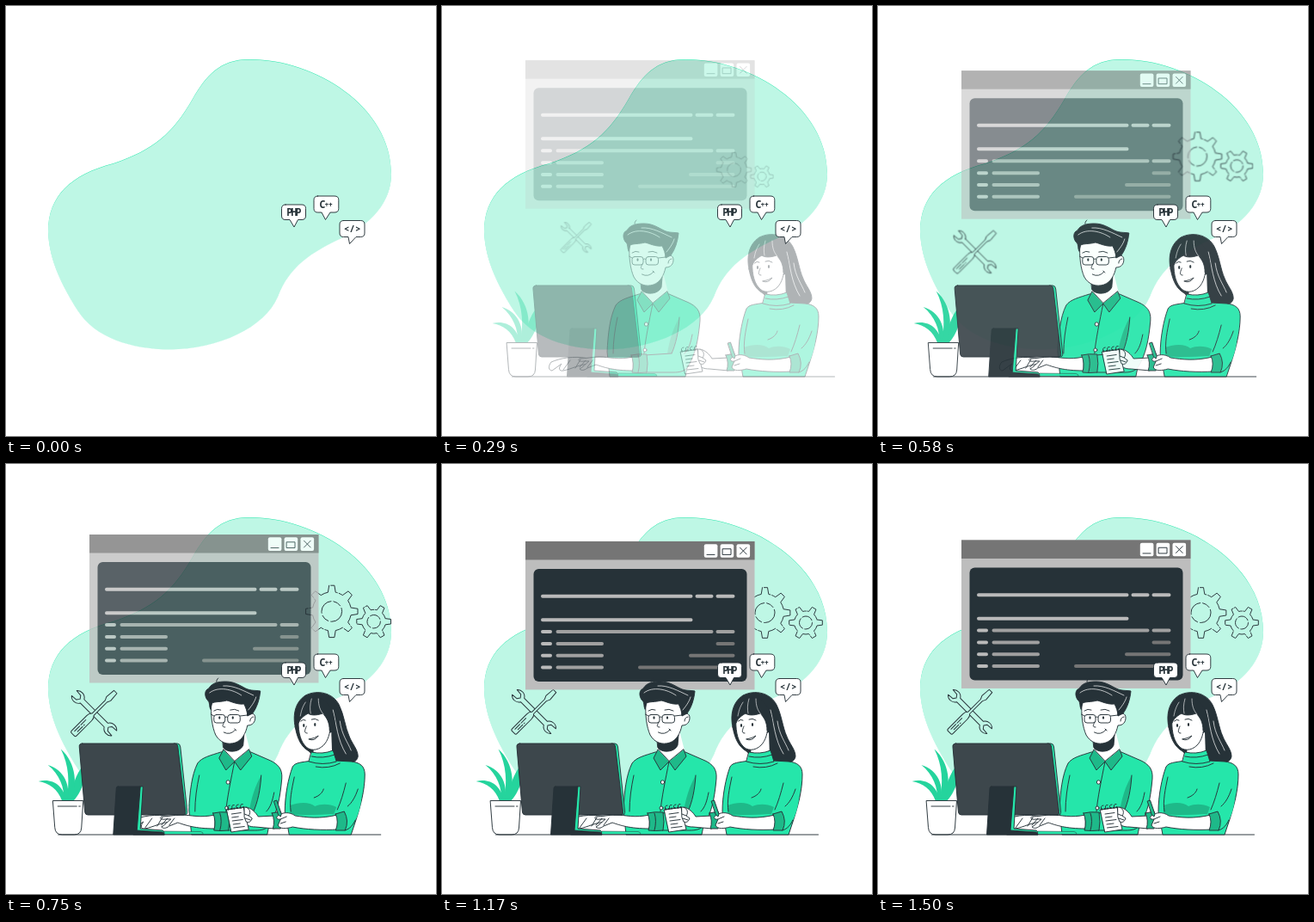
Write an HTML page that moves like this. It is 500 px wide and 500 px high and loops after 1.54 s.

```html
<!DOCTYPE html>
<html lang="en">
<head>
<meta charset="utf-8">
<title>Developers at work</title>
<style>
html, body { margin: 0; width: 100%; height: 100%; overflow: hidden; background: #fff; }
svg { display: block; width: 100vw; height: 100vh; }
.art { stroke: #263238; stroke-width: .95; stroke-linejoin: round; stroke-linecap: round; }
.g { fill: #25e6aa; }
.d { fill: #1eb989; }
.leaf { fill: #25d49d; }
.w { fill: #fff; }
.k { fill: #263238; }
.n { fill: none; }
.x { stroke: none; }
.white { stroke: #fff; }
text { font-family: "Noto Sans Mono", "DejaVu Sans Mono", monospace; font-weight: 700; fill: #263238; text-anchor: middle; stroke: none; }
</style>
</head>
<body>
<svg viewBox="0 0 500 500">
  <defs>
    <path id="blob" d="M285 62C250 61 233 80 217 108C194 148 172 167 125 183C75 196 49 221 49 262C50 297 67 328 84 355C104 386 146 399 190 399.5C247 399 301 374 316 338C329 303 356 286 388 271C425 254 448 228 448 195C448 116 358 62 285 62Z"/>
  </defs>
  <use href="#blob" fill="#25e6aa"/>
  <use href="#blob" y=".5" fill="#fff" opacity=".7"/>

  <g id="icons" class="art n">
    <path id="bigGear" stroke-dasharray="34 2 14 2"/>
    <circle cx="375.5" cy="173" r="11.5" stroke-dasharray="19 3 9 3"/>
    <path id="smallGear" stroke-dasharray="26 1.5 12 1.5"/>
    <circle cx="423" cy="184.5" r="7.5" stroke-dasharray="13 2.5"/>
    <g transform="translate(107 288) rotate(45)">
      <path d="M-19-3H19A8 8 0 0 1 32-4L25-3.4L22.5 0L25 3.4L32 4A8 8 0 0 1 19 3H-19A8 8 0 0 1-32 4L-25 3.4L-22.5 0L-25-3.4L-32-4A8 8 0 0 1-19-3Z"/>
    </g>
    <g transform="translate(107 288) rotate(-45)">
      <path fill="#bdf7e5" d="M-34-2Q-34-4-32-4H-8Q-4-4-2-1.5H19L23-3.3L34-2.4V2.4L23 3.3L19 1.5H-2Q-4 4-8 4H-32Q-34 4-34 2Z"/>
      <path d="M-30-1.3H-11M-28 1.5H-17" stroke-dasharray="8 2"/>
    </g>
  </g>

  <g id="win">
    <rect x="97" y="90" width="266.5" height="172.5" fill="#bdbdbd"/>
    <rect x="97" y="90" width="266.5" height="21.5" fill="#757575"/>
    <rect x="106.5" y="122" width="248" height="131" rx="6" class="k"/>
    <g stroke-width="4" stroke-linecap="round" fill="none">
      <path stroke="#bababa" d="M117 153.7H289.5M296.5 153.7H313.5M320.5 153.7H338.5M117 181.2H289.5M117 195H126M117 209H126M117 222.8H126M117 236.6H126"/>
      <path stroke="#a0a0a0" d="M134.5 195H313.5M320.5 195H338.5M134.5 209H186M134.5 222.8H186M134.5 236.6H186"/>
      <path stroke="#757575" d="M320.5 209H338.5M289 222.8H338.5M230 236.6H338.5"/>
    </g>
    <g class="w">
      <rect x="304.8" y="93.3" width="15.6" height="15.6" rx="2"/>
      <rect x="323.6" y="93.3" width="15.6" height="15.6" rx="2"/>
      <rect x="342.5" y="93.3" width="15.6" height="15.6" rx="2"/>
    </g>
    <path class="art n" d="M308 105.500H317M326.500 98.800H336V105.500H326.500ZM346.5 97.2L354.2 105M354.2 97.2L346.5 105"/>
  </g>

  <g id="man" class="art">
    <path class="g" d="M248 335C236 339 226 341 221 348C214 362 212 382 211 402L214 431H302L304 421C314 405 317 388 319 366C320 354 314 349 306 345L283 335Z"/>
    <path class="n" d="M223 362C220 376 218 390 218 404M264 346C260 366 255 390 254 404"/>
    <path class="d x" d="M295 362C288 374 283 390 281 404H286C291 393 294 377 295 362Z"/>
    <path class="n" d="M295 362C294 379 291 393 286 404M310 382C308 392 306 399 301 404"/>
    <path class="w x" d="M251 318L250 334L264 346L282 333L276 310Z"/>
    <path class="k" d="M250 320C254 327 268 327 275 315L274 327C270 336 255 336 251 330Z"/>
    <path class="d" d="M251 332L246 342L254 356L264 346Z"/>
    <path class="d" d="M281 332L284 340L271 356L264 346Z"/>
    <circle class="w" cx="256.500" cy="370" r="2.200"/>
    <circle class="w" cx="255" cy="400" r="2"/>
    <path class="w" d="M237 276C236 292 238 306 242 315C247 324 256 327 265 324C273 321 277 313 279 304C285 304 288 300 288 295C288 290 283 288 279 292L279 272Z"/>
    <path class="n" d="M282 299C282 296 284 294 286 294"/>
    <path class="k" d="M236 285C234 281 236 277 232 274C229 269 229 263 234 261C238 254 246 253 254 253C264 253 271 258 277 261C283 264 289 263 294 264C293 274 290 283 285 290L279 293C279 288 277 283 275 279C267 280 260 276 255 275C248 277 241 276 238 278Z"/>
    <path class="n white" stroke-width=".7" d="M235 266C245 258 262 262 272 269M251 258C263 257 275 264 286 269M280 286C285 280 288 275 289 271"/>
    <path class="n" d="M247 257C242 255 242 252 245 249M240 287Q244 284 248 286M259 286Q264 284 269 287"/>
    <g class="n">
      <rect x="240" y="291.500" width="13" height="9.500" rx="3"/>
      <rect x="256" y="291.500" width="14.500" height="9.500" rx="3"/>
      <path d="M236.500 291L240 293M253 294.500Q254.500 293 256 294.500M270.500 293L279 292M252 300C250 304 249 306 253 306M251.500 312Q259 316 265 309M264 308L266 310"/>
    </g>
    <ellipse class="k x" cx="246.500" cy="295" rx="1.100" ry="1.800"/>
    <ellipse class="k x" cx="262" cy="295" rx="1.100" ry="1.800"/>
    <path class="w" d="M190 410C172 406 155 410 146 414C142 419 143 424 147 424L158 416C154 421 155 425 160 424C170 422 178 417 190 416Z"/>
    <path class="w" d="M241 408C224 412 213 408 202 408C194 408 186 410 179 410C176 412 179 414 184 413L190 413C186 416 183 420 179 422C181 424 184 424 188 421L198 417C207 420 218 424 241 424Z"/>
    <path class="n" d="M168 412L160 423M180 411L174 421M186 412L179 420M194 412L188 420"/>
    <path class="g" d="M304 421C300 425 295 426 288 426H256L254 406L286 404"/>
    <path class="d" d="M239 406Q247 404 257 405Q259 416 257 426Q248 427 240 426Q243 416 239 406Z"/>
    <path class="n" d="M247 406Q250 415 247 426"/>
  </g>

  <g id="desk" class="art">
    <!-- plant -->
    <g class="leaf x">
      <path d="M76 392C78 376 83 360 92 350C96 366 89 382 80 392Z"/>
      <path d="M72 392C76 370 75 350 65.500 331.500C84 348 85 374 77 392Z"/>
      <path d="M69 392C70 376 64 361 50.500 350C70 356 77 374 73 392Z"/>
      <path d="M67 392C62 378 52 371 39.500 369C56 365 69 374 72 392Z"/>
    </g>
    <path class="w" d="M56.500 391.500H91.500L89.500 423Q89 431 81 431H67Q59 431 58.500 423Z"/>
    <path class="n" d="M62 398H84M86.500 398H88"/>

    <!-- computer -->
    <path class="g" d="M197 325H201Q204 325 204.500 329L212.500 404Q213 408 209 408H200Z"/>
    <path fill="#3d474c" d="M90.500 325H198Q201 325 201.500 328L210.500 404.500Q211 408 207 408H97Q94 408 93.500 405L87 329Q86.500 325 90.500 325Z"/>
    <path class="g" d="M157 375H161L158 424L184 426Q187 428 186 431H150Z"/>
    <path class="k" d="M132 375H158L154 426L184 428Q186 429 186 431H126.500L130 377Q130 375 132 375Z"/>
    <path class="g" d="M186 427L228 427.500Q231 428 231 430.500H186Z" stroke-width=".5"/>
    <path class="n" d="M62.500 431H437.500"/>
  </g>

  <g id="woman" class="art">
    <path class="k" d="M338 306C335 291 338 277 350 269C364 262 382 266 389 280C395 292 396 306 401 317C404 325 411 332 411 340C410 347 402 349 394 347L358 345C360 339 356 335 351 332C343 326 340 316 338 306Z"/>
    <path class="n white" stroke-width=".7" d="M382 286C386 302 387 321 397 337M390 299C392 315 399 323 403 333"/>
    <path class="w x" d="M360 322L359 340H381L380 312Z"/>
    <path class="g" d="M357 345C345 347 338 347 335 352C330 365 326 386 326 404L331 431H403L408 416C414 398 419 379 419 361C419 351 413 347 403 346L385 345Z"/>
    <path class="d x" d="M332 397C343 393 355 393 361 398C368 395 378 395 386 399L383 407C367 407 350 410 332 407Z"/>
    <path class="n" d="M337 364C334 378 331 392 333 404M360 388C366 386 370 382 371 378M397 371C394 383 391 393 387 402M411 378C408 387 404 394 399 398"/>
    <path class="g" d="M357 335Q370 338 382 333L386 346Q370 351 354 346Z"/>
    <path class="n" d="M357 340Q370 343 384 338M362 352Q377 355 390 348"/>
    <path class="w" d="M342 294C341 308 343 320 349 327C354 334 364 334 371 327C376 322 379 313 379 302L376 286H346Z"/>
    <path class="k" d="M340 301C340 286 345 276 358 272C373 270 382 282 384 302L378 310C378 301 375 295 370 290C362 293 355 292 353 290C350 292 345 294 342 301Z"/>
    <path class="n white" stroke-width=".6" d="M357 273C355 280 355 285 356 290M365 273C365 281 367 287 371 291M350 277C346 283 345 288 344 293"/>
    <path class="n" d="M344.500 299Q347 296 350 298M357 297Q361 295 365 298M351 305C349 310 348 313 352 313M354 320Q360 323 365 316Q361 319 354 320"/>
    <ellipse class="k x" cx="348" cy="304" rx="1.100" ry="2"/>
    <ellipse class="k x" cx="361" cy="303" rx="1.100" ry="2"/>

    <!-- notebook and hands -->
    <path class="w" d="M281 399C287 400 292 405 295 410L314 409V424L292 422C285 422 280 420 278 415Z"/>
    <path class="d" d="M311 406L321 404Q325 414 321 424L312 424Q315 415 311 406Z"/>
    <path class="w" d="M258.500 402L278 399.500L284 425L264 428Z"/>
    <path class="n" d="M264 407L275 405.500M264.500 411L272 410M265 415L277 413.500M266 419L274 418M266.500 423L279 421.500"/>
    <path class="n" stroke-width="1.800" stroke-dasharray=".5 3" d="M260 401.500L278 399"/>
    <path class="n" d="M260 402Q258 397 262 397M265 401Q263 396 267 396.500M270 400.500Q268 396 272 396M275 400Q273 395 277 395.500"/>
    <path class="w" d="M279 399C285 399 287 405 284 409L288 412Q286 418 281 416L279 411Z"/>
    <path class="n" d="M284 409L279 407M286 414L280 412"/>
    <path class="w" d="M387 408C367 413 351 411 338 409C331 404 323 405 318 409C315 411 317 414 321 413L318 420C320 425 328 424 335 422C350 425 369 426 388 425Z"/>
    <path class="g x" d="M388 407C400 404 406 396 410 388L415 389C414 400 410 413 403 423C399 427 393 427 387 426Z"/>
    <path class="d" d="M385 407L395 404Q401 415 396 426L385 426Q389 416 385 407Z"/>
    <path class="n" d="M396 426C402 424 405 420 408 414M321 413L328 410M321 418L327 416"/>
    <path class="d" d="M313.500 392L316.500 391L322 407L321 410L318.500 408Z"/>
  </g>

  <g class="art">
    <path class="w" d="M325 231H344Q348.500 231 348.500 235.500V244Q348.500 248.500 344 248.500H339.500L335 257L330 248.500H325Q320.500 248.500 320.500 244V235.500Q320.500 231 325 231Z"/>
    <path class="w" d="M362.500 221H382Q386.800 221 386.800 225.500V235.500Q386.800 240 382 240H377L371.500 248.500L367 240H362.500Q358 240 358 235.500V225.500Q358 221 362.500 221Z"/>
    <path class="w" d="M392.500 249.500H412.500Q417 249.500 417 254V264Q417 268.500 412.500 268.500H407L399.500 276.500L398 268.500H392.500Q388 268.500 388 264V254Q388 249.500 392.500 249.500Z"/>
    <text x="334" y="244" font-size="11.500" letter-spacing="-1.700">PHP</text>
    <text x="372" y="234.800" font-size="11.500" letter-spacing="-1">C<tspan font-size="8" letter-spacing="-.3" dy="-1">++</tspan></text>
    <text x="402.600" y="263" font-size="11">&lt;/&gt;</text>
  </g>
</svg>
<script>
const LOOP = 1540, STEP = 1000 / 24;
const el = id => document.getElementById(id);
const clamp = v => Math.min(1, Math.max(0, v));

function bezier(x1, y1, x2, y2) {
  const at = (a, b, s) => 3 * (1 - s) * (1 - s) * s * a + 3 * (1 - s) * s * s * b + s * s * s;
  return x => {
    if (x <= 0) return 0;
    if (x >= 1) return 1;
    let lo = 0, hi = 1;
    for (let i = 0; i < 24; i++) {
      const mid = (lo + hi) / 2;
      if (at(x1, x2, mid) < x) lo = mid; else hi = mid;
    }
    return at(y1, y2, lo);
  };
}
const spring = bezier(.36, -.01, .5, 1.38);
const smooth = bezier(.42, 0, .58, 1);

function gear(cx, cy, teeth, outer, root) {
  const pitch = 2 * Math.PI / teeth;
  const pt = (r, a) => (cx + r * Math.cos(a)).toFixed(2) + ' ' + (cy + r * Math.sin(a)).toFixed(2);
  let d = '';
  for (let i = 0; i < teeth; i++) {
    const a = i * pitch;
    d += (i ? `A${root} ${root} 0 0 1 ` : 'M') + pt(root, a - pitch * .25) +
      'L' + pt(outer, a - pitch * .13) + 'L' + pt(outer, a + pitch * .13) +
      'L' + pt(root, a + pitch * .25);
  }
  return d + `A${root} ${root} 0 0 1 ` + pt(root, -pitch * .25);
}
el('bigGear').setAttribute('d', gear(375.5, 173, 8, 29.5, 22));
el('smallGear').setAttribute('d', gear(423, 184.5, 6, 19.5, 13.5));

function place(id, transform, opacity) {
  el(id).setAttribute('transform', transform);
  el(id).setAttribute('opacity', clamp(opacity));
}

function draw(ms) {
  const n = Math.floor((ms % LOOP + 4) / STEP);
  const t = n * STEP, shown = n > 1 ? 1 : 0;
  const p = spring((t + 30) / 1000);
  const q = smooth((t + 110) / 1300);
  const slide = 30 * (1 - p);
  const float = -10 * smooth((t - 1090) / 1500);
  place('man', `translate(${-slide} 0)`, p * shown);
  place('desk', `translate(${slide} 0)`, p * shown);
  place('woman', `translate(${slide} 0)`, p * shown);
  place('icons', `translate(261.5 228) scale(${.5 + .5 * p}) translate(-261.5 -228)`, p * shown);
  place('win', `translate(0 ${-33.5 * (1 - q) + float})`, q * shown);
}

function tick() {
  draw(performance.now());
  requestAnimationFrame(tick);
}
tick();
</script>
</body>
</html>
```
